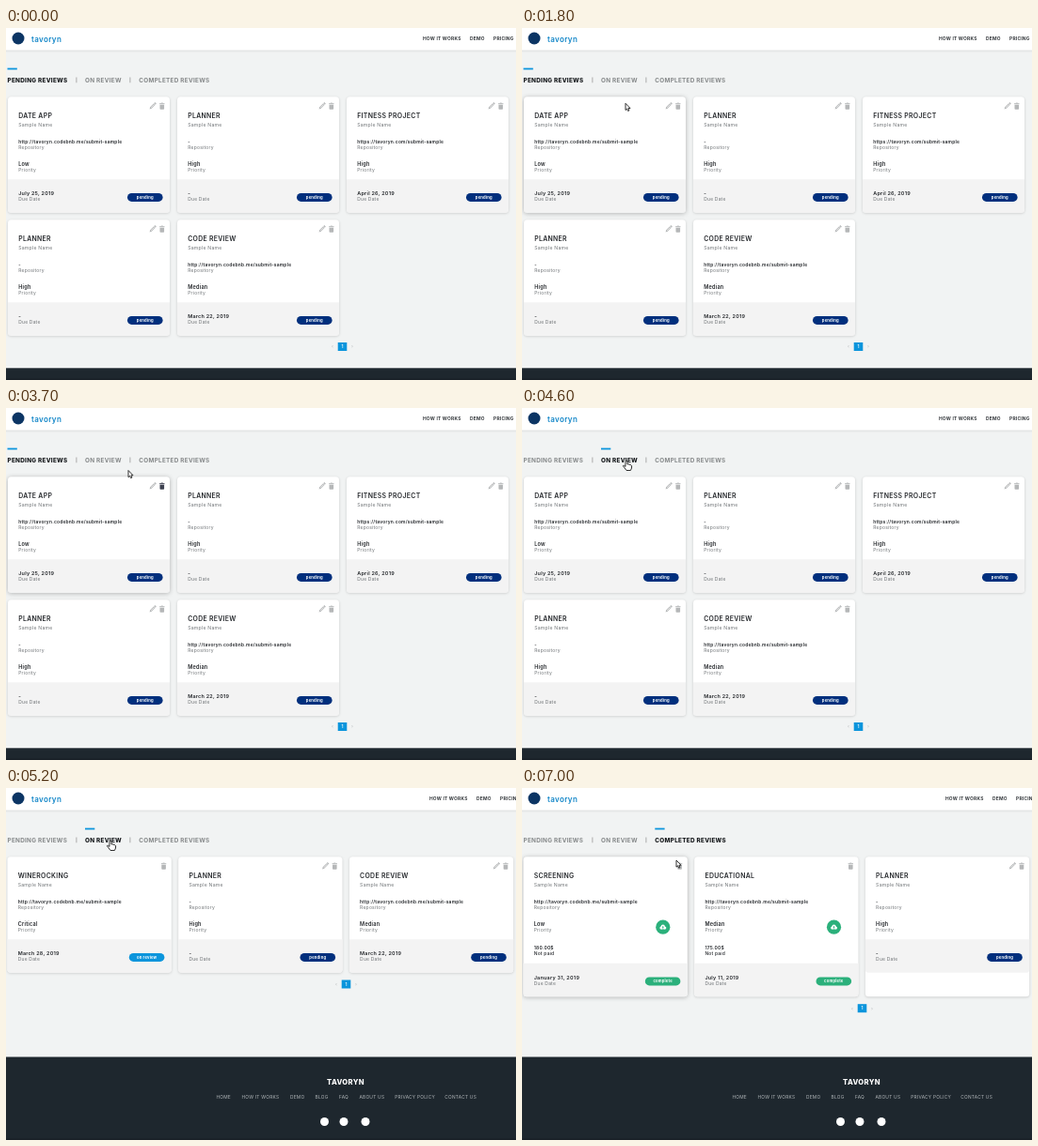
These frames come from a looping animation (542x375 px, 7.1 s). An HTML page with a canvas:

```html
<!DOCTYPE html>
<html lang="en">
<head>
<meta charset="utf-8">
<title>Review board</title>
<style>
html, body { margin: 0; width: 100%; height: 100%; overflow: hidden; background: #f1f3f3; }
canvas { display: block; width: 542px; height: 375px; }
</style>
</head>
<body>
<canvas id="stage"></canvas>
<script>
const W = 542, H = 375, LOOP = 7100, STEP = 100;
const canvas = document.getElementById('stage');
const ctx = canvas.getContext('2d');
const scale = window.devicePixelRatio || 1;
canvas.width = W * scale;
canvas.height = H * scale;

const INK = '#24272b', GREY = '#6f7376', ICON = '#b5b7b8';
const NAVY = '#002f7d', BLUE = '#0b95dc', GREEN = '#2bb07b';
const URL_A = 'http://tavoryn.codebnb.me/submit-sample';
const URL_B = 'https://tavoryn.com/submit-sample';

// Page switches and tab clicks, in ms
const TO_REVIEW = 4700, TO_DONE = 6400;
const CLICK_REVIEW = 4600, CLICK_DONE = 6100;

const job = (title, url, priority, date, status = 'pending', pay = '') =>
  ({ title, url, priority, date, status, pay });
const planner = job('PLANNER', '-', 'High', '-');
const review = job('CODE REVIEW', URL_A, 'Median', 'March 22, 2019');
const pages = [
  { left: 2, pitch: 180, width: 172, nav: 443, pager: [357.5, 339.5], footer: 362.3,
    jobs: [job('DATE APP', URL_A, 'Low', 'July 25, 2019'), planner,
           job('FITNESS PROJECT', URL_B, 'High', 'April 26, 2019'), planner, review] },
  { left: 1.5, pitch: 181.7, width: 174.3, nav: 450, pager: [361.5, 209], footer: 286.5,
    jobs: [job('WINEROCKING', URL_A, 'Critical', 'March 28, 2019', 'on review'), planner, review] },
  { left: 1.5, pitch: 181.7, width: 174.3, nav: 450, pager: [361.5, 234.7], footer: 286.5, tall: true,
    jobs: [job('SCREENING', URL_A, 'Low', 'January 31, 2019', 'complete', '180.00$'),
           job('EDUCATIONAL', URL_A, 'Median', 'July 11, 2019', 'complete', '175.00$'), planner] }
];
const tabs = [['PENDING REVIEWS', 1.5, 66], ['ON REVIEW', 84, 123], ['COMPLETED REVIEWS', 141.3, 217]];

// Pointer path: time, x, y of the tip
const path = [
  [300, -8, 80], [800, 35, 51], [1300, 35, 51], [2000, 140, 92], [2400, 157, 82],
  [2900, 157, 82], [3200, 166, 82], [3500, 166, 82], [3700, 130, 66.5], [4100, 111, 56],
  [5400, 111, 56], [5900, 155, 56], [6300, 155, 56], [6700, 149, 146],
  [6850, 149, 146], [7000, 164, 77]
];

const clamp = v => Math.max(0, Math.min(1, v));

function pointerAt(t) {
  if (t < path[0][0]) return { x: -50, y: -50 };
  for (let i = 1; i < path.length; i++) {
    const [t0, x0, y0] = path[i - 1], [t1, x1, y1] = path[i];
    if (t <= t1) {
      const k = (t - t0) / (t1 - t0);
      return { x: x0 + (x1 - x0) * k, y: y0 + (y1 - y0) * k };
    }
  }
  const [, x, y] = path[path.length - 1];
  return { x, y };
}

// Slightly tracked text, centred vertically on its capitals
function text(str, x, y, size, color, weight = 400, align = 'left') {
  ctx.font = `${weight} ${size}px Inter, "Open Sans", sans-serif`;
  ctx.letterSpacing = `${size * 0.045}px`;
  ctx.textAlign = align;
  ctx.fillStyle = color;
  ctx.fillText(str, x, y + size * 0.37);
}

function rect(x, y, w, h, color) {
  ctx.fillStyle = color;
  ctx.fillRect(x, y, w, h);
}

function round(x, y, w, h, r, color) {
  ctx.beginPath();
  ctx.roundRect(x, y, w, h, r);
  ctx.fillStyle = color;
  ctx.fill();
}

function disc(x, y, r, color) {
  ctx.beginPath();
  ctx.arc(x, y, r, 0, Math.PI * 2);
  ctx.fillStyle = color;
  ctx.fill();
}

function shadow(color, blur, dy) {
  ctx.shadowColor = color;
  ctx.shadowBlur = blur * scale;
  ctx.shadowOffsetY = dy * scale;
}

function pencil(x, y, hot) {
  ctx.save();
  ctx.translate(x, y);
  ctx.rotate(Math.PI / 4);
  ctx.beginPath();
  ctx.rect(-1.1, -4.4, 2.2, 1.3);
  ctx.moveTo(-1.1, -2.7);
  ctx.lineTo(1.1, -2.7);
  ctx.lineTo(1.1, 2.9);
  ctx.lineTo(0, 4.8);
  ctx.lineTo(-1.1, 2.9);
  ctx.closePath();
  ctx.fillStyle = hot ? '#22262a' : ICON;
  ctx.fill();
  if (!hot) rect(-0.35, -2.2, 0.7, 4.8, '#f0f0f0');
  ctx.restore();
}

function trash(x, y, hot) {
  const c = hot ? '#3d4150' : ICON;
  rect(x - 1, y - 3.6, 2, 0.8, c);
  rect(x - 2.7, y - 3, 5.4, 1, c);
  round(x - 2.3, y - 1.5, 4.6, 5, [0, 0, 0.8, 0.8], c);
}

function badge(x, y, status, fill) {
  const color = { pending: NAVY, 'on review': BLUE, complete: GREEN }[status];
  if (fill < 1) round(x, y - 4.5, 37.6, 9, 4.5, '#e3e9ed');
  ctx.globalAlpha = fill;
  round(x, y - 4.5, 37.6, 9, 4.5, color);
  ctx.globalAlpha = 1;
  text(status, x + 18.8, y, 4.15, fill < 0.5 ? '#6f8798' : '#fff', 700, 'center');
}

function download(x, y) {
  disc(x, y, 7.6, GREEN);
  disc(x - 1.9, y + 0.7, 1.5, '#fff');
  disc(x + 2, y + 0.7, 1.5, '#fff');
  disc(x, y - 0.7, 2.1, '#fff');
  rect(x - 1.9, y + 0.4, 3.9, 1.8, '#fff');
  rect(x - 0.4, y - 1.2, 0.8, 2, GREEN);
  ctx.beginPath();
  ctx.moveTo(x - 1.2, y + 0.3);
  ctx.lineTo(x + 1.2, y + 0.3);
  ctx.lineTo(x, y + 1.6);
  ctx.fill();
}

function card(j, x, y, w, h, o) {
  const right = x + w, tx = x + 11.2, foot = j.pay ? 25.5 : 0;
  ctx.save();
  shadow(o.hover ? 'rgba(0,0,0,.28)' : 'rgba(0,0,0,.17)', o.hover ? 5 : 3, 0.8);
  round(x, y, w, h, 3.5, '#fff');
  ctx.restore();
  const end = j.pay ? h : 123.5;
  round(x, y + 88 + foot, w, end - 88 - foot, [0, 0, 3.5, 3.5], '#f3f3f3');

  if (j.status === 'pending') pencil(right - 18, y + 9.8, o.hotPencil);
  trash(right - 8.2, y + 10, o.hotTrash);
  text(j.title, tx, y + 20.6, 6.9, INK, 600);
  text('Sample Name', tx, y + 30, 5.15, GREY);
  text(j.url, tx, y + 47.6, 4.9, INK, 600);
  text('Repository', tx, y + 53.8, 5, GREY);
  text(j.priority, tx, y + 71.4, 5.5, INK, 600);
  text('Priority', tx, y + 77.8, 5, GREY);
  if (j.pay) {
    text(j.pay, tx, y + 97.2, 4.95, INK, 600);
    text('Not paid', tx, y + 103.4, 4.95, INK, 500);
    download(right - 26, y + 75);
  }
  text(j.date, tx, y + 103 + foot, 5.45, INK, 600);
  text('Due Date', tx, y + 109.3 + foot, 4.95, GREY);
  badge(right - 45, y + 107.2 + foot, j.status, o.fill);
}

function header(page) {
  ctx.save();
  shadow('rgba(0,0,0,.22)', 3, 0.5);
  rect(-5, -5, W + 10, 28.7, '#fff');
  ctx.restore();
  disc(13, 11, 6.5, '#0c3564');
  text('tavoryn', 27, 11.6, 8, '#1286c8', 600);
  ['HOW IT WORKS', 'DEMO', 'PRICING'].forEach((s, i) =>
    text(s, page.nav + [0, 50, 75][i], 11.4, 4.9, '#33373b', 700));
}

function tabBar(active, p) {
  tabs.forEach(([label, x0, x1], i) => {
    const over = p.x >= x0 && p.x <= x1 && p.y >= 50 && p.y <= 60;
    const lit = i === active || over;
    if (lit) rect(x0, 42.6, 10.3, 1.8, BLUE);
    text(label, x0, 55.4, 6.35, lit ? '#15181b' : '#858889', lit ? 800 : 700);
  });
  rect(74.5, 52.5, 0.8, 5.8, '#999');
  rect(131.5, 52.5, 0.8, 5.8, '#999');
}

function pager([x, y]) {
  rect(x - 4.8, y - 4.5, 9.6, 9, BLUE);
  text('1', x, y, 4.7, '#fff', 600, 'center');
  text('‹', x - 10.5, y, 5, '#b0b3b5', 400, 'center');
  text('›', x + 10.5, y, 5, '#b0b3b5', 400, 'center');
}

function footer(y) {
  rect(0, y, W, H - y, '#1e272e');
  rect(0, 373.5, W, 1.5, '#192027');
  if (y > 300) return;
  text('TAVORYN', 361, 313.5, 7.6, '#fff', 800, 'center');
  [['HOME', 223.5], ['HOW IT WORKS', 250.5], ['DEMO', 302], ['BLOG', 328.5], ['FAQ', 354],
   ['ABOUT US', 375.5], ['PRIVACY POLICY', 413.3], ['CONTACT US', 466.3]]
    .forEach(([s, x]) => text(s, x, 329.2, 4.85, '#b2b7ba'));
  [338.5, 359, 382].forEach(x => disc(x, 355.5, 4.5, '#fff'));
}

function polygon(points) {
  ctx.beginPath();
  points.forEach(([x, y]) => ctx.lineTo(x, y));
  ctx.closePath();
  ctx.fillStyle = '#fff';
  ctx.strokeStyle = '#1b1b1b';
  ctx.lineWidth = 0.9;
  ctx.lineJoin = 'round';
  ctx.fill();
  ctx.stroke();
}

function pointer({ x, y }, hand) {
  ctx.save();
  ctx.translate(x, y);
  if (hand) {
    polygon([[-1, 0.6], [0, 0], [0.9, 0.6], [1, 4], [2.3, 3.8], [3, 4.4], [4.2, 4.3], [4.8, 5.2],
             [5.6, 5.6], [5.5, 8], [4.4, 10.5], [0, 10.5], [-2, 7.8], [-3.6, 5.8], [-2.8, 5], [-1, 6.4]]);
  } else {
    polygon([[0, 0], [0, 7.2], [1.6, 5.8], [2.7, 8.2], [3.9, 7.6], [2.9, 5.3], [5, 5.2]]);
  }
  ctx.restore();
}

function draw(t) {
  const index = t < TO_REVIEW ? 0 : t < TO_DONE ? 1 : 2;
  const active = t < CLICK_REVIEW ? 0 : t < CLICK_DONE ? 1 : 2;
  const page = pages[index];
  const p = pointerAt(t), late = pointerAt(t - 100);

  // New cards settle into place while their badge fills in
  const since = t - [-LOOP, TO_REVIEW, TO_DONE][index];
  const shift = 8.7 * clamp(1 - since / 400);
  const fill = clamp((since - 85) / 320);

  ctx.setTransform(scale, 0, 0, scale, 0, 0);
  rect(0, 0, W, H, '#f1f3f3');
  header(page);
  tabBar(active, p);

  const h = page.tall ? 149 : 123.5;
  page.jobs.forEach((j, i) => {
    const col = i % 3;
    const x = page.left + col * page.pitch - (col ? shift : 0);
    const y = 73.2 + Math.floor(i / 3) * 131;
    const inside = q => q.x > x && q.x < x + page.width && q.y > y && q.y < y + h;
    card(j, x, y, page.width, h, {
      hover: inside(p) || inside(late),
      hotPencil: !i && t >= 2300 && t < 3100,
      hotTrash: !i && t >= 3100 && t < 3800,
      fill: j.status === 'pending' ? 1 : fill
    });
  });
  pager(page.pager);
  footer(page.footer);

  const onTab = p.y >= 50 && p.y <= 60 && tabs.some(([, a, b]) => p.x >= a && p.x <= b);
  const onIcon = p.x > 152 && p.x < 170 && p.y > 79 && p.y < 88;
  const onDownload = index === 2 && Math.hypot(p.x - 150, p.y - 148) < 8;
  pointer(p, onTab || onIcon || onDownload);
}

function tick() {
  const t = performance.now() % LOOP;
  draw(Math.floor(t / STEP) * STEP);
  requestAnimationFrame(tick);
}
tick();
</script>
</body>
</html>
```
